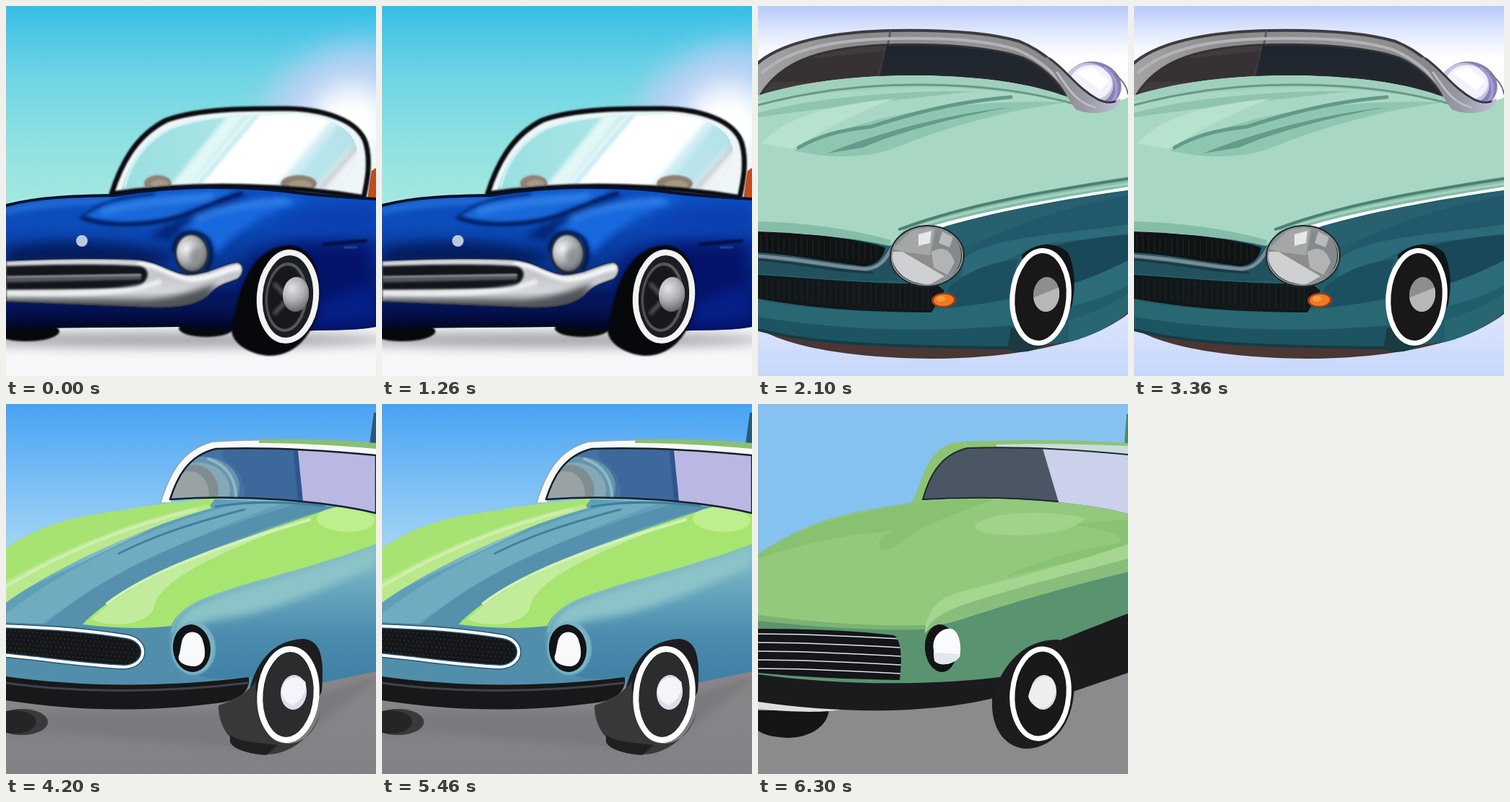
An HTML page with a canvas that plays this animation: 512x512 px, repeating every 8400 ms.

```html
<!DOCTYPE html>
<html lang="en">
<head>
<meta charset="utf-8">
<title>Four cars</title>
<style>
html, body { margin: 0; width: 100%; height: 100%; overflow: hidden; }
canvas { display: block; width: 100vw; height: 100vh; }
</style>
</head>
<body>
<canvas id="stage" width="512" height="512"></canvas>
<script>
const g = document.getElementById('stage').getContext('2d');
const HOLD = 2100;

function withBlur(blur, draw) {
  g.save();
  if (blur) g.filter = `blur(${blur}px)`;
  draw();
  g.restore();
}

function shape(d, fill, blur = 0) {
  withBlur(blur, () => { g.fillStyle = fill; g.fill(new Path2D(d)); });
}

function line(d, color, width, blur = 0) {
  withBlur(blur, () => {
    g.strokeStyle = color;
    g.lineWidth = width;
    g.lineCap = g.lineJoin = 'round';
    g.stroke(new Path2D(d));
  });
}

function oval(x, y, rx, ry, fill, rot = 0, blur = 0) {
  withBlur(blur, () => {
    g.fillStyle = fill;
    g.beginPath();
    g.ellipse(x, y, rx, ry, rot, 0, 7);
    g.fill();
  });
}

function ring(x, y, rx, ry, color, width, rot = 0) {
  g.strokeStyle = color;
  g.lineWidth = width;
  g.beginPath();
  g.ellipse(x, y, rx, ry, rot, 0, 7);
  g.stroke();
}

function rect(x, y, w, h, fill) {
  g.fillStyle = fill;
  g.fillRect(x, y, w, h);
}

function stops(gr, colors) {
  colors.forEach((c, i) => gr.addColorStop(i / (colors.length - 1), c));
  return gr;
}
const grad = (x0, y0, x1, y1, ...colors) => stops(g.createLinearGradient(x0, y0, x1, y1), colors);
const glow = (x, y, r, ...colors) => stops(g.createRadialGradient(x, y, 0, x, y, r), colors);

function inside(d, draw) {
  g.save();
  g.clip(new Path2D(d));
  draw();
  g.restore();
}

function wheel(x, y, ry, disc, rim, width, hub, hubX = 398) {
  oval(x, y, 39, ry + 1, disc, .08);
  ring(x, y, 39, ry, rim, width, .08);
  oval(hubX, 399, 18, 24, hub, .08);
}

function blueCar() {
  rect(0, 0, 512, 512, '#f7f8fa');
  rect(0, 0, 512, 290, grad(0, 0, 0, 270, '#36bee7', '#6bd3e5', '#8ce0e2', '#a4e8df'));
  oval(455, 125, 105, 62, 'rgba(196,208,247,.85)', -.45, 20);
  oval(478, 170, 62, 60, '#fff', -.3, 18);
  rect(498, 200, 14, 68, '#f4f7fa');
  shape('M506 228 L512 224 V268 H500Z', '#c24d20');
  oval(230, 462, 300, 11, '#a4a6ab', 0, 8);
  oval(28, 450, 46, 14, '#07080c', 0, 1);
  oval(277, 446, 38, 12, '#07080c', 0, 1);

  const frame = 'M146 260 C158 222 178 180 222 158 C268 141 340 142 390 142 C440 143 488 158 498 190 C505 216 500 242 495 265 C400 249 270 242 146 260Z';
  const glass = 'M160 254 C169 222 186 190 226 169 C280 150 340 150 390 149 C440 151 480 166 485 196 C487 218 474 246 440 256 C350 244 250 242 160 254Z';
  shape(frame, '#eef5f8');
  inside(glass, () => {
    rect(140, 140, 360, 130, grad(150, 0, 490, 0, '#98dfe0', '#a4e3e4', '#bce8ee', '#b4e2e8'));
    shape('M345 142 L470 142 L372 255 L248 255Z', '#fff', 6);
    shape('M315 142 L338 142 L250 255 L222 255Z', '#e3f7f7', 3);
    line('M352 145 L262 252', '#c4eaf2', 6, 2);
    line('M468 145 L386 252', '#d2edf5', 8, 4);
    shape('M492 190 L470 205 L420 262 H490Z', '#f1f3f6', 5);
    line('M486 195 L436 252', '#b9c3ca', 5, 3);
    oval(210, 246, 19, 12, '#8f8377', 0, 1);
    oval(213, 248, 12, 8, '#a99a88', 0, 1);
    oval(405, 246, 25, 12, '#8d8072', 0, 1);
    oval(407, 249, 16, 8, '#a89784', 0, 1);
  });
  line('M164 250 C171 222 188 190 228 169 C280 150 340 150 390 149', '#dff5f5', 3, 1);
  line(frame, '#0b0c10', 7, .8);

  const body = 'M0 276 C45 264 95 263 150 262 C230 248 330 248 400 258 C440 263 480 265 512 267 V444 C480 450 440 448 400 450 L300 448 L240 444 L0 446Z';
  shape(body, grad(0, 255, 0, 446, '#0d50c2', '#0c4cba', '#08389a', '#052473', '#030e48'));
  inside(body, () => {
    shape('M0 335 C90 316 180 330 236 345 L200 362 H0Z', '#041d60', 8);
    line('M0 284 C50 272 100 270 150 269', '#2a7ae2', 7, 4);
    shape('M104 292 C130 268 200 256 300 254 C340 256 290 276 240 296 C190 308 140 302 104 292Z', '#1868da', 4);
    line('M106 293 C140 306 195 304 236 293 C275 281 300 266 325 260', '#03195a', 6, 2);
    line('M106 291 C130 270 165 264 205 260', '#042c7c', 4, 2);
    line('M135 284 C180 272 240 268 285 264', '#3f8ded', 6, 4);
    shape('M200 318 C240 290 290 270 340 262 L300 282 C260 294 240 306 226 326Z', '#03236f', 6);
    shape('M240 310 C280 280 340 264 420 268 C370 282 320 306 290 345 C290 330 270 306 240 310Z', '#1868de', 5);
    line('M262 295 C295 280 340 272 390 270', '#3b8bef', 7, 5);
    shape('M512 325 C440 325 380 320 335 350 L300 450 H512Z', '#041369', 13);
    shape('M512 275 C460 272 400 280 350 312 C400 305 460 318 512 312Z', '#0c3fb2', 9);
    shape('M512 385 C470 395 440 405 425 425 L435 442 L512 436Z', '#05208a', 10);
    line('M440 330 C460 328 480 326 498 325', '#020c3c', 4, 1);
    line('M468 334 H485', '#3c5aa6', 2, 1);
    shape('M0 412 H240 L300 392 L340 400 V450 H0Z', grad(0, 410, 0, 446, '#05155c', '#040f4a', '#02051c'), 4);
  });
  line('M0 276 C45 264 95 263 150 262 C230 248 330 248 400 258 C440 263 480 265 512 267', '#06102c', 4, .5);
  oval(105, 325, 8, 8, '#bcc8dc');

  const bumper = 'M0 353 C60 350 130 349 175 351 C210 352 225 369 250 372 C280 372 300 357 320 355 C330 357 330 371 320 378 C302 384 292 387 280 400 C264 415 235 418 200 417 L0 409Z';
  shape(bumper, grad(0, 350, 0, 418, '#d9dbdf', '#c2c5ca', '#d6d8db', '#6d7077'));
  inside(bumper, () => {
    line('M185 356 C215 358 225 374 255 378 C285 378 305 364 322 362', '#f7f8f9', 7, 2);
    shape('M0 360 C80 357 150 357 186 360 C202 365 198 381 180 391 L0 393Z', '#14151a', 1.5);
    line('M0 379 L184 375', '#55585f', 7, 1.5);
    line('M0 375 L186 372', '#979ba2', 2.5, 1);
    line('M0 398 C90 400 170 398 212 382', '#eff0f2', 7, 2);
    shape('M0 406 L195 408 C240 404 260 392 292 384 L270 422 H0Z', '#505359', 4);
  });
  line(bumper, '#23262e', 1.5, 1);

  line('M232 338 C234 312 258 308 276 320 C287 331 286 352 278 364', '#03143e', 5, 2);
  oval(257, 343, 24, 28, '#20242c', -.1, 1);
  oval(257, 342, 21, 25, glow(250, 336, 32, '#f4f5f6', '#b5babd', '#5d6369'), -.1, 1);
  oval(264, 347, 9, 14, '#8c9194', .2, 4);

  shape('M314 440 C324 372 350 332 392 331 C430 333 438 380 432 420 C422 462 396 485 362 484 C332 481 312 464 312 448Z', '#07080c', 1);
  wheel(390, 402, 61, '#1c1e22', '#f3f3f3', 8, '#9ea1a5', 401);
  ring(388, 403, 27, 46, '#55585d', 4, .08);
  oval(386, 403, 24, 42, '#17181c', .08, 1);
  line('M372 385 L384 398 M372 425 L386 410', '#55585d', 5, 2);
  oval(401, 399, 18, 24, glow(396, 391, 32, '#e2e3e4', '#b0b2b5', '#67696d'), .08);
}

function tealCar() {
  rect(0, 0, 512, 512, '#fff');
  rect(0, 0, 512, 70, grad(0, 0, 0, 70, '#b8c9fa', '#e0e8fd', '#fff'));
  rect(0, 400, 512, 112, grad(0, 400, 0, 512, '#e2eafd', '#c6d7fb'));
  shape('M0 446 C60 482 180 488 250 488 C380 486 470 460 512 426 V390 H0Z', '#4b3634');

  const arch = 'M0 76 C40 43 120 34 190 33 C260 32 320 36 362 48 C410 68 430 98 460 124 L440 150 L0 128Z';
  shape(arch, grad(0, 0, 440, 0, '#a3a3a5', '#8a8a8c', '#939395', '#86868a'));
  const glass = 'M6 122 C32 78 80 59 170 54 C260 51 330 58 368 72 C395 84 415 105 425 124 L220 108Z';
  shape(glass, grad(0, 50, 0, 120, '#1b2630', '#27282d'));
  inside(glass, () => {
    shape('M0 40 H182 L160 130 H0Z', '#403b3d');
    shape('M0 80 L175 62 L162 105 H0Z', '#363133');
  });
  line('M0 79 C40 45 120 35 190 34 C260 33 320 37 362 49 C400 65 418 86 434 110', '#3d3c40', 4);
  line('M183 36 L180 52', '#5d5c60', 3);
  line('M6 92 C44 58 110 46 190 45 C270 44 320 48 360 61 C395 77 415 98 432 122', '#b4b4b6', 4);
  line('M4 122 C32 78 80 59 170 54 C260 51 330 58 368 72 C395 84 415 105 426 124', '#333236', 3);

  const hood = 'M0 124 C70 102 150 96 220 96 C320 97 390 110 430 127 C470 140 495 136 512 126 V250 C400 268 300 286 236 306 L182 332 C120 318 60 314 0 312Z';
  shape(hood, '#a8d8c3');
  inside(hood, () => {
    shape('M0 124 C70 98 150 95 220 95 C320 96 390 110 440 132 L430 134 C330 110 200 104 0 132Z', '#9fd0bc');
    line('M0 137 C80 116 160 108 230 109 C320 110 380 120 440 136', '#6a968a', 3);
    shape('M0 148 C80 126 210 116 300 118 C230 126 130 136 0 154Z', '#8fc5af');
    shape('M5 190 C40 150 110 136 190 128 C150 142 100 165 48 198Z', '#b7e2cd');
    shape('M50 200 C130 160 240 128 430 133 C330 146 250 172 185 198 C140 214 80 208 50 200Z', '#8fc6b1');
    line('M56 196 C84 180 112 172 156 167 C225 145 280 132 350 126', '#64998a', 5);
    shape('M95 204 C170 174 260 150 350 140 C270 154 190 176 145 196Z', '#659b8a');
    shape('M0 298 C80 300 140 312 184 324 L182 336 L0 316Z', '#86bda9');
    shape('M512 236 C400 254 300 270 205 306 L182 332 L300 302 L512 262Z', '#86bda9');
  });

  const side = 'M0 314 C60 314 120 318 182 332 L262 304 C340 282 430 266 512 255 V424 C490 442 465 456 430 465 L345 474 C230 470 90 472 0 447Z';
  shape(side, '#225d6b');
  inside(side, () => {
    shape('M512 255 C430 268 340 282 262 306 L286 332 C370 300 440 286 512 270Z', '#28606f');
    shape('M512 262 C440 276 380 292 300 330 L285 365 C350 325 440 318 512 308Z', '#22586b');
    shape('M285 350 C320 318 430 316 512 302 V322 C450 322 400 325 370 338 C340 355 300 370 282 375Z', '#2d6a79');
    shape('M512 316 C470 320 440 324 410 332 L440 390 L512 362Z', '#194858');
    shape('M512 352 C480 368 455 378 436 384 V415 C470 407 495 396 512 386Z', '#2c6b79');
    shape('M262 392 C290 362 340 352 360 350 C350 380 345 405 348 425 L262 425Z', '#1c5060');
    shape('M0 407 C110 426 220 430 350 405 V460 C220 455 100 452 0 430Z', '#296872');
    shape('M0 430 C120 450 240 452 350 442 V490 H0Z', '#1d5461');
    shape('M512 398 C480 418 455 428 430 435 V480 H512Z', '#286672');
  });
  line('M196 309 C290 274 400 256 512 239', '#4c8074', 4);
  line('M224 304 C310 278 400 262 512 246', '#a3d4c0', 3);
  line('M0 448 C90 472 230 471 345 473', '#163b45', 4);

  shape('M0 312 C60 314 130 320 176 334 C174 350 160 360 146 360 C95 354 50 344 0 341Z', '#101314');
  shape('M0 372 C90 378 170 386 246 384 L258 394 L240 424 C150 424 70 418 0 405Z', '#121719');
  for (let x = 4; x < 240; x += 8) {
    if (x < 166) line(`M${x} ${316 + x * .08} V${338 + x * .1}`, '#222729', 1);
    line(`M${x} ${377 + x * .04} V${404 + x * .07}`, '#20282a', 1);
  }
  shape('M0 343 C50 346 100 358 150 362 L182 346 L194 380 C120 382 60 373 0 370Z', '#21515d');
  line('M0 346 C60 350 110 362 150 364 C168 362 176 352 186 334', '#7d8b94', 5);
  line('M0 351 C60 356 110 368 158 369', '#173a44', 3);

  oval(234, 346, 52, 43, '#20282c', -.05);
  const lamp = 'M186 350 C184 324 208 307 235 307 C264 307 281 324 281 345 C280 370 258 386 234 385 C209 384 190 370 186 350Z';
  shape(lamp, '#8b8d8e');
  inside(lamp, () => {
    shape('M186 336 L215 308 L246 304 L238 345 L200 340Z', '#a4a6a7');
    shape('M180 340 L200 340 L258 374 L230 390 L190 380Z', '#cfd0d2');
    shape('M244 316 L262 312 L286 335 L280 360 L258 372 L240 352Z', '#86898b');
    shape('M240 340 C258 330 268 340 272 355 L262 372 L243 362Z', '#b1b3b5');
    shape('M222 316 L240 311 L238 328 L222 332Z', '#e6e7e7');
    shape('M255 312 L270 320 L265 334 L250 328Z', '#b9bbbc');
  });
  ring(234, 346, 49, 40, '#8d9496', 2, -.05);
  oval(257, 407, 17, 10, '#a43a14', -.05);
  oval(257, 407, 14, 8, '#f07a24', -.05);
  oval(253, 405, 6, 4, '#f99a44');

  shape('M365 345 C385 326 410 326 428 340 C440 360 440 400 432 420 L390 460Z', '#101416');
  shape('M350 445 L420 450 C400 474 370 484 345 476Z', '#1b3a42');
  wheel(391, 402.5, 64, '#1a1718', '#fff', 7, '#8f8d8f', 399);
  inside('M380 404 L420 388 V430 H380Z', () => oval(399, 399, 18, 24, '#b9b7ba', .08));

  oval(464, 110, 39, 33, '#8680b4', .15);
  oval(458, 108, 34, 29, '#c4c3e4', .15);
  oval(461, 106, 29, 24, '#f1f2fc', .1);
  shape('M440 92 L462 84 L486 104 L474 116Z', '#fff');
  line('M480 86 C497 98 500 116 492 130', '#a29dce', 4);
  line('M494 94 C506 104 511 114 512 122', '#77738f', 2);
  shape('M398 70 C425 88 440 112 470 128 C485 134 496 130 502 128 C500 150 458 152 440 143 C428 130 418 100 398 78Z', grad(410, 0, 500, 0, '#88888c', '#9b9aa8', '#c0bed8'));
  line('M404 73 C428 90 442 114 470 129 C480 134 488 134 494 132', '#38373c', 3);
  line('M414 92 C428 112 440 134 466 140', '#bcbcc4', 3);
}

function limeCar() {
  rect(0, 0, 512, 512, grad(0, 0, 0, 230, '#48a2f2', '#7dc0f5', '#b0dcf3'));
  rect(0, 345, 512, 167, grad(0, 370, 0, 512, '#89878a', '#838185'));
  shape('M0 425 L300 425 L440 400 L512 376 V384 C460 415 430 460 360 480 L60 455 L0 460Z', '#7b797d', 6);
  oval(22, 440, 36, 18, '#3a393c');
  oval(12, 440, 30, 16, '#252427');
  shape('M509 12 H512 V56 H503Z', '#2c5878');

  const body = 'M0 200 C35 174 80 158 140 150 C190 142 215 137 285 131 C360 128 450 138 512 150 V370 L436 386 L330 390 L0 385Z';
  shape(body, grad(0, 190, 0, 390, '#86bfc9', '#68a6bd', '#4a8bad', '#3f7fa5'));
  inside(body, () => {
    shape('M0 302 C100 305 180 316 232 306 L230 345 C260 390 300 380 340 378 V400 H0Z', '#508eab');
    shape('M512 195 C410 235 320 250 265 275 C235 290 230 310 232 330 C260 295 300 300 340 290 C420 270 470 240 512 226Z', '#8cc3c8', 6);
    shape('M0 270 L285 132 L460 138 L455 145 L108 306 L0 302Z', '#609fb8');
    shape('M0 290 C80 230 180 175 320 138 L380 138 C240 190 130 245 50 304 L0 302Z', '#70acc0');
    shape('M55 304 C130 240 230 190 400 139 L455 143 C330 175 190 235 108 306Z', '#5590ac');
    shape('M0 200 C35 174 80 158 140 150 C190 142 230 134 290 130 L282 141 C210 160 70 220 0 272Z', '#a6e372');
    shape('M0 245 C80 200 180 158 280 139 L285 144 C190 170 70 225 0 275Z', '#b9e98c');
    line('M0 252 C80 205 170 168 262 146', '#cfeeb0', 4);
    shape('M458 142 L512 152 V194 C410 232 320 248 265 273 C240 286 232 298 229 307 C190 312 145 310 106 305 C150 258 250 208 458 142Z', '#a7e470');
    shape('M118 298 C170 248 270 205 400 165 C300 205 215 240 205 280 C200 304 150 312 118 298Z', '#c2ec9c');
    line('M140 276 C200 230 300 196 420 160', '#d3f2b6', 4);
    oval(470, 160, 40, 17, '#beee8e', .05);
    line('M156 207 C190 190 230 172 330 146', '#427f9e', 3);
    line('M290 142 C340 134 390 135 440 141', '#3d7ca0', 3);
  });
  line('M512 195 C410 234 320 250 265 274 C238 288 231 302 230 315', '#84bdc0', 2);

  shape('M214 136 C226 98 242 64 286 53 C360 48 450 50 512 56 V78 L300 66 C255 72 240 100 228 136Z', '#f7fafa');
  line('M214 136 C226 98 242 64 286 52 C320 49 350 49 390 49', '#8fa7b0', 1.5);
  shape('M350 50 C410 47 470 50 512 54 V62 C460 57 400 54 350 54Z', '#8abf72');
  const glass = 'M227 132 C236 104 250 72 290 62 C370 59 450 65 512 71 V151 C440 134 330 125 227 132Z';
  shape(glass, '#4572a3');
  inside(glass, () => {
    shape('M300 55 H405 L411 140 H330 C335 110 320 85 300 75Z', '#3d689b');
    oval(272, 115, 51, 42, '#6794ab');
    oval(266, 119, 44, 38, '#83a9b6');
    oval(260, 121, 34, 37, '#7f8d91');
    oval(253, 124, 28, 31, '#9aa3a4');
    line('M280 76 C306 84 320 106 318 135', '#8cb7c3', 4);
    shape('M402 55 H512 V155 H411Z', '#bab7e3');
    shape('M397 55 H403 L412 145 H405Z', '#2f568b');
  });
  line(glass, '#15202a', 2.5);

  const grille = 'M-8 307 C60 309 120 314 168 322 C198 328 196 362 164 364 C110 362 50 352 -8 347Z';
  shape(grille, '#151619');
  inside(grille, () => {
    for (let y = 312; y < 364; y += 6)
      for (let x = 0; x < 185; x += 6) rect(x + y % 4, y + x * .08, 2, 2, '#2a2b2f');
  });
  line(grille, '#2b5870', 7);
  line(grille, '#fff', 4);
  shape('M0 377 C90 390 210 394 336 378 C338 396 326 408 300 413 C190 428 90 424 0 410Z', '#18181b');
  line('M0 386 C100 400 220 400 334 386', '#414247', 3);

  oval(259, 338, 31, 37, '#79b3c3', -.05, 1);
  oval(257, 338, 26, 33, '#111317', -.1);
  shape('M243 330 C246 313 264 311 271 324 C278 342 277 360 262 363 C246 363 235 356 240 346Z', '#f8f9fb');

  shape('M334 410 C342 360 368 326 412 325 C438 328 440 355 437 398 L400 460 L320 460Z', '#1d1d20');
  shape('M294 417 C315 410 335 400 346 382 C344 420 352 470 392 470 C420 468 436 440 438 410 C436 450 400 484 362 485 C335 484 315 474 310 461 C298 448 294 432 294 417Z', '#38383b');
  shape('M310 458 C330 470 350 468 376 472 L360 486 C335 484 315 478 310 468Z', '#202023');
  wheel(390.5, 402, 63, '#2c2b2e', '#fff', 8, '#dcdcea');
  shape('M381 395 C385 378 402 374 414 384 C418 396 408 412 396 417 C386 412 381 404 381 395Z', '#f4f4fa');
}

function greenCar() {
  rect(0, 0, 512, 512, '#85c2f0');
  rect(0, 345, 512, 167, '#8b8a8d');
  shape('M0 424 H98 C96 446 72 462 40 462 C22 461 8 458 0 452Z', '#151518');
  shape('M0 404 L122 420 C110 428 50 427 0 422Z', '#dcdee0');
  shape('M510 14 H512 V56 H507Z', '#4c8a64');

  const body = 'M0 208 C30 188 62 170 110 156 C150 145 190 142 222 134 C330 127 430 130 512 152 V372 L436 398 L330 396 L0 385Z';
  shape(body, '#5a9370');
  inside(body, () => {
    shape('M512 290 C480 302 445 316 415 328 L420 410 L512 375Z', '#1b1b1e');
    shape('M0 205 C30 185 62 168 110 152 L222 130 C330 127 430 130 512 150 V232 C430 252 350 275 275 300 L232 308 C150 308 70 302 0 294Z', '#93c97c');
    shape('M0 208 C60 165 150 145 235 135 L330 130 C280 150 230 165 200 190 C170 215 150 190 188 176 C120 180 60 194 0 214Z', '#89c172');
    shape('M512 160 V200 C450 215 400 225 340 240 C400 210 460 200 500 192 C510 180 470 172 430 166Z', '#89c273');
    shape('M300 168 C320 148 400 146 452 158 C440 176 380 186 325 180 C308 178 300 174 300 168Z', '#a2d38b');
    shape('M512 194 C420 225 340 244 280 260 C244 270 232 290 231 318 C240 304 262 302 280 298 C360 270 440 248 512 230Z', '#a5d68f');
    shape('M512 214 C430 236 350 256 290 276 C260 285 240 298 233 312 C250 304 270 303 280 298 C360 270 440 250 512 232Z', '#88bd7c');
    shape('M0 292 C80 302 150 308 231 306 V312 C150 314 70 308 0 300Z', '#7bb373');
  });

  shape('M212 136 C226 122 226 66 272 53 C360 48 450 50 512 54 V76 L300 66 C258 72 240 104 228 135Z', '#8dc375');
  shape('M330 56 C400 54 460 56 512 58 V71 C450 64 390 60 330 60Z', '#cadcdb');
  const glass = 'M228 132 C236 104 250 70 290 61 C370 58 450 64 512 70 V152 C450 134 330 127 228 132Z';
  shape(glass, '#4b5664');
  inside(glass, () => shape('M392 55 H512 V155 L416 136 Z', '#cbd0eb'));
  line('M415 135 C330 127 270 130 228 132 C236 104 250 70 290 61 C370 58 450 64 512 70', '#1d2b2c', 2);

  const grille = 'M0 311 C70 311 140 314 188 320 C198 326 200 350 196 382 C130 381 60 378 0 372Z';
  shape(grille, '#141518');
  inside(grille, () => {
    for (let y = 318; y < 370; y += 12)
      line(`M0 ${y} C70 ${y} 140 ${y + 4} 198 ${y + 7}`, '#dfe4e2', 1.4);
  });
  shape('M0 374 C100 388 230 392 350 376 L326 407 C230 430 110 428 0 412Z', '#1b1b1e');

  oval(253, 338, 22, 33, '#121417', -.08);
  shape('M243 340 C240 322 254 309 268 311 C280 316 282 338 279 350 C270 361 252 364 244 355Z', '#fafbfc');
  shape('M243 344 L278 346 C274 362 250 364 244 355Z', '#e4e7ea');

  shape('M324 408 C335 365 365 326 414 326 C438 330 440 362 437 402 C432 450 404 477 370 477 C338 474 322 445 324 408Z', '#1c1c1f');
  wheel(391, 401, 62, '#19191c', '#fff', 7, '#d9d9dc', 395);
  shape('M374 405 C378 384 392 373 406 379 C416 392 412 410 400 419 C390 424 378 418 374 405Z', '#eeeef0');
}

const scenes = [blueCar, tealCar, limeCar, greenCar];
const start = performance.now();
let shown = -1;

function tick() {
  const i = Math.floor((performance.now() - start) / HOLD) % scenes.length;
  if (i !== shown) {
    scenes[i]();
    shown = i;
  }
  requestAnimationFrame(tick);
}
tick();
</script>
</body>
</html>
```
